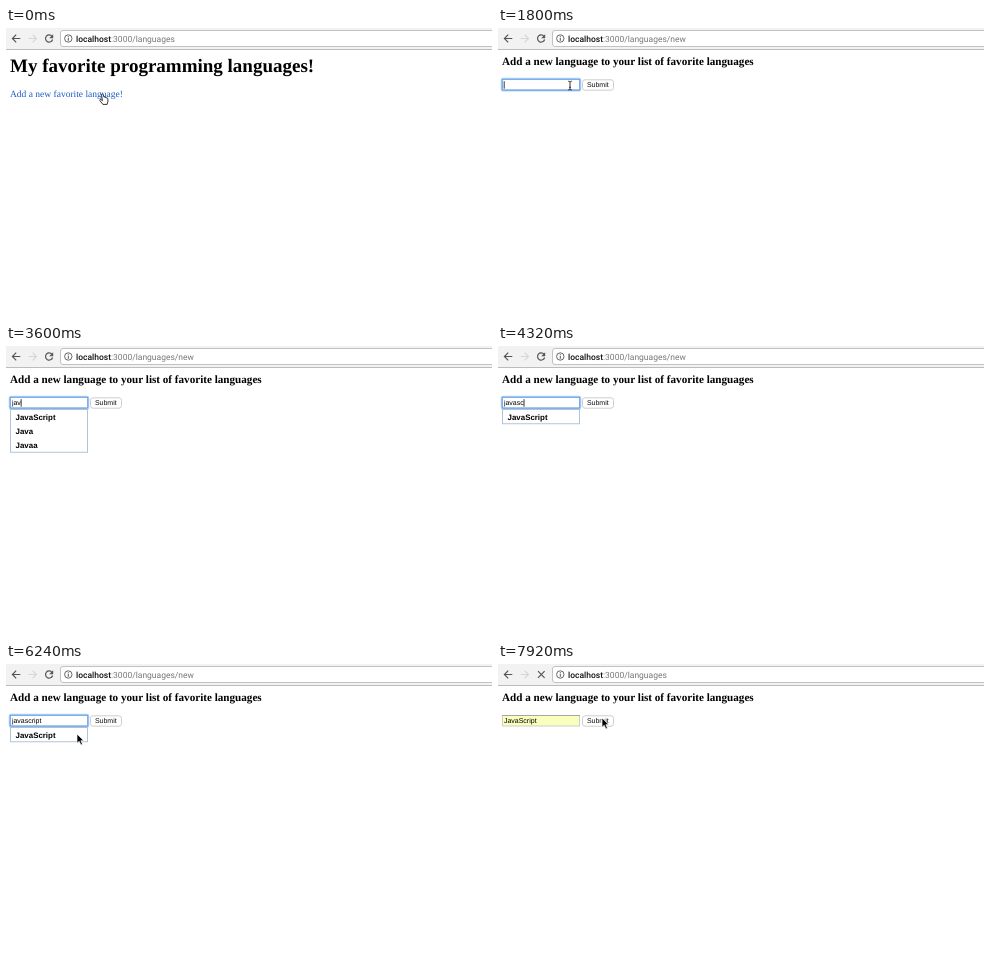
Animation of 486 by 290 pixels, one loop 8000 ms. Source, as an HTML page:

```html
<!DOCTYPE html>
<html lang="en">
<head>
<meta charset="utf-8">
<title>Favorite languages</title>
<style>
  html, body { margin: 0; width: 100%; height: 100%; overflow: hidden; background: #fff; }
  svg { display: block; width: 486px; height: 290px; }
  text { white-space: pre; text-rendering: geometricPrecision; }
  .serif { font-family: "Liberation Serif", Times, serif; }
  .ui { font: 7px "Liberation Sans", Arial, sans-serif; }
  .url { font: 500 8.5px Roboto, Arial, sans-serif; }
  .row { font: bold 7.9px "Liberation Sans", Arial, sans-serif; }
  .icon { fill: none; stroke: #555; stroke-width: 1.2; }
</style>
</head>
<body>
<svg viewBox="0 0 486 290">
  <rect width="486" height="21" fill="#f2f2f2"/>
  <path d="M0 21.5H486" stroke="#bcbcbc"/>
  <path d="M490 2.5H57a2.5 2.5 0 0 0-2.5 2.5V16a2.5 2.5 0 0 0 2.5 2.5H490" fill="#fff" stroke="#c2c2c2"/>
  <path class="icon" d="M14.3 10.5H6.5M10.2 6.7L6.4 10.5l3.8 3.8"/>
  <path class="icon" style="stroke:#d6d6d6" d="M22.5 10.5h7.8M26.6 6.7l3.8 3.8-3.8 3.8"/>
  <g id="reload">
    <path class="icon" d="M46 8.3A3.6 3.6 0 1 0 46.6 11.5"/>
    <path d="M47.2 6.2v4h-4z" fill="#555"/>
  </g>
  <path id="stop" class="icon" d="M40 7.2l6.6 6.6M46.6 7.2L40 13.8"/>
  <circle class="icon" cx="62.3" cy="10.5" r="3.7" style="stroke-width:.9"/>
  <path class="icon" d="M62.3 8.2v1.1M62.3 10v2.8" style="stroke-width:1"/>
  <text class="url" x="70" y="13.5" fill="#111">localhost<tspan id="path" fill="#777" font-weight="400"></tspan></text>

  <g id="listPage" class="serif">
    <text x="4" y="43.8" font-size="19" font-weight="bold">My favorite programming languages!</text>
    <text x="4" y="69.4" font-size="9.5" fill="#1a5cc4">Add a new favorite language!</text>
  </g>

  <g id="formPage">
    <text class="serif" x="4" y="36.7" font-size="11.13" font-weight="bold">Add a new language to your list of favorite languages</text>
    <rect id="field" x="4.5" y="51.5" width="77" height="10.5" stroke="#cdcdcd"/>
    <path id="inset" d="M4 51.5H82" stroke="#a6a6a6"/>
    <g id="ring" fill="none">
      <rect x="3.4" y="50.5" width="79.2" height="12.4" rx="1.6" stroke="#b4d2f6" stroke-width="1.4"/>
      <rect x="4.2" y="51.3" width="77.6" height="10.8" rx=".8" stroke="#69a5ec" stroke-width="1.1"/>
    </g>
    <text id="value" class="ui" x="5.9" y="59.4"></text>
    <path id="caret" stroke="#000" stroke-width=".8"/>
    <rect x="84.5" y="51.8" width="31" height="10.4" rx="2.5" fill="#fff" stroke="#c9c9c9" stroke-width=".9"/>
    <text class="ui" x="88.9" y="59.4" fill="#111">Submit</text>
    <g id="menu">
      <rect id="menuBox" x="4.5" y="63.5" width="77" fill="#fff" stroke="#b0c4d8"/>
      <rect id="hover" x="5" y="64" width="76" height="13.3" fill="#dcdcdc"/>
      <g id="rows" class="row"></g>
    </g>
  </g>

  <g id="cursor" stroke-linejoin="round">
    <path id="arrow" d="M0 0V9.3L2.2 7.3L3.9 11L5.5 10.3L3.9 6.7H6.8Z" fill="#000" stroke="#fff" stroke-width=".7"/>
    <path id="hand" d="M0 .7C.1-.4 1.6-.4 1.8.7L2.5 3.2C3 2.7 3.8 2.9 4 3.6C4.6 3.2 5.3 3.6 5.3 4.2C6 4 6.4 4.5 6.4 5.2V7.4L5.6 10.4H1.4L-1.7 6.5C-2.1 5.6-1 5.1-.4 5.7L.9 6.6Z" fill="#fff" stroke="#000" stroke-width=".8"/>
    <path id="beam" d="M-1.8-4.3Q0-4.3 0-3.3Q0-4.3 1.8-4.3M0-3.3V3.6M-1.8 4.5Q0 4.5 0 3.5Q0 4.5 1.8 4.5M-.9 1.8H.9" fill="none" stroke="#222" stroke-width=".9"/>
  </g>
</svg>
<script>
const LOOP = 8000, TICK = 120;
const $ = id => document.getElementById(id);
const show = (id, on) => { $(id).style.display = on ? '' : 'none'; };
const within = (t, from, to) => t >= from && t < to;

const AT = { link: 480, page: 960, loaded: 1200, focus: 1800, open: 2160, preview: 6480, pick: 6600, blur: 7560, submit: 7680 };
const KEYS = [3000, 3240, 3480, 3840, 4080, 4320, 4560, 4800, 5040, 5400];
const TYPED = 'javascript', PICKED = 'JavaScript';
const RECENT = ['JavaScript', 'Java', 'C', 'Darovik', 'red', 'purple'];
const KNOWN = ['JavaScript', 'Java', 'Javaa'];
const ROW = 14.25;

// time, x, y, shape
const MOVES = [
  [0, 95.5, 66, 'hand'], [600, 95.5, 66, 'hand'], [840, 113, 69, 'hand'],
  [960, 152, 71, 'arrow'], [1200, 150, 71, 'arrow'], [1560, 92, 61, 'arrow'],
  [1680, 72, 57.5, 'beam'], [3000, 72, 57.5, ''], [6120, 72, 57.5, 'beam'],
  [6240, 71, 70, 'arrow'], [6360, 70, 79, 'arrow'], [6600, 69, 67, 'arrow'],
  [7080, 69, 67, 'arrow'], [7440, 104, 54, 'arrow'], [LOOP, 104, 54, 'arrow']
];

function cursorAt(t) {
  const i = MOVES.findLastIndex(m => m[0] <= t);
  const [t0, x0, y0, shape] = MOVES[i];
  const [t1, x1, y1] = MOVES[i + 1];
  const p = (t - t0) / (t1 - t0), k = p * p * (3 - 2 * p);
  return { x: x0 + (x1 - x0) * k, y: y0 + (y1 - y0) * k, shape };
}

function drawMenu(items, hovered) {
  show('menu', items.length);
  show('hover', hovered);
  $('menuBox').setAttribute('height', items.length * ROW);
  $('rows').innerHTML = items.map((name, i) =>
    `<text x="9.6" y="${73.7 + i * ROW}">${name}</text>`).join('');
}

function drawField(t) {
  const typed = TYPED.slice(0, KEYS.filter(k => k <= t).length);
  const filled = t >= AT.preview;
  const focused = within(t, AT.focus, AT.blur);
  $('value').textContent = filled ? PICKED : typed;
  $('field').setAttribute('fill', filled ? '#faffbd' : '#fff');
  show('ring', focused);
  show('inset', !focused);

  const lastEdit = [AT.focus, ...KEYS, AT.pick].findLast(k => k <= t);
  show('caret', focused && (t - lastEdit) % 1000 < 500);
  const x = 6.2 + $('value').getComputedTextLength();
  $('caret').setAttribute('d', `M${x} 53.2V60.7`);
  return typed;
}

function draw(t) {
  const onForm = t >= AT.page;
  const loading = within(t, AT.link, AT.loaded) || t >= AT.submit;
  show('listPage', !onForm);
  show('formPage', onForm);
  show('reload', !loading);
  show('stop', loading);
  $('path').textContent = ':3000/languages' + (within(t, AT.link, AT.submit) ? '/new' : '');

  const pointer = cursorAt(t);
  $('cursor').setAttribute('transform', `translate(${pointer.x} ${pointer.y})`);
  ['arrow', 'hand', 'beam'].forEach(id => show(id, id === pointer.shape));

  const typed = drawField(t);
  const matches = typed ? KNOWN.filter(n => n.toLowerCase().startsWith(typed)) : RECENT;
  const open = within(t, AT.open, AT.pick);
  drawMenu(open ? matches : [], within(t, AT.preview, AT.pick));
}

let last = -1;
function frame(now) {
  const t = Math.floor((now % LOOP) / TICK) * TICK;
  if (t !== last) draw(last = t);
  requestAnimationFrame(frame);
}
draw(0);
requestAnimationFrame(frame);
</script>
</body>
</html>
```
